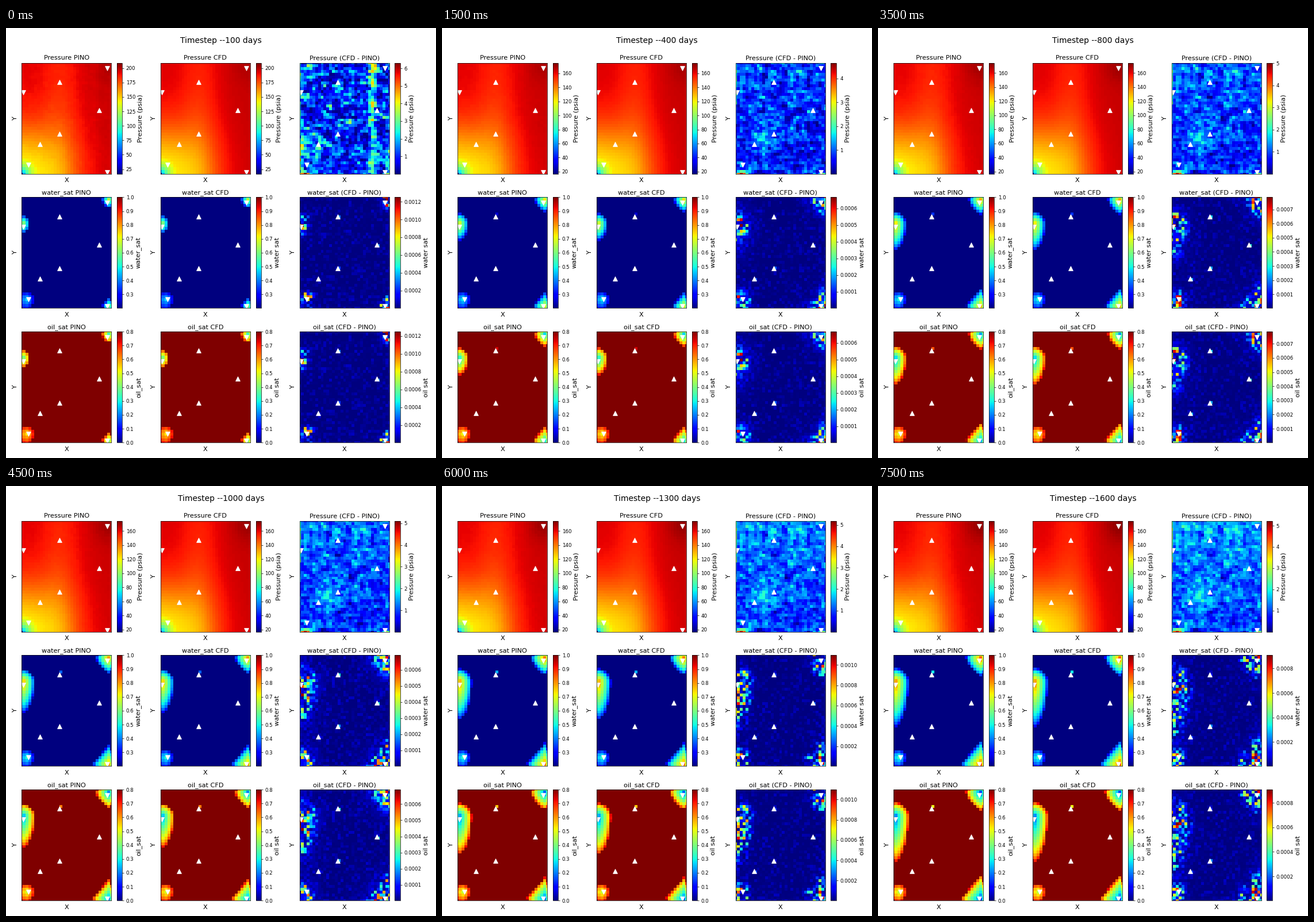
A matplotlib script for the animation above (8 s loop, 748x748 px).

```python
import numpy as np
import matplotlib.pyplot as plt
from matplotlib.animation import FuncAnimation

plt.rcParams["font.family"] = "DejaVu Sans"

SIZE, STEPS = 748, 16
NX, NY = 33, 40
X, Y = np.meshgrid(np.arange(NX), np.arange(NY))
R = np.hypot(X, Y)

INJECTORS = [(30.5, 37.0), (0.5, 28.6), (2.5, 3.1), (30.5, 0.6)]
PRODUCERS = [(13.6, 32.3), (27.6, 22.4), (13.6, 14.0), (6.6, 10.35)]


def bump(cx, cy, sx, sy):
    return np.exp(-((X - cx) / sx) ** 2 - ((Y - cy) / sy) ** 2)


def texture(rng):
    """Unit noise, loosely correlated between neighbouring cells."""
    n = rng.standard_normal((NY + 1, NX + 1))
    return (n[1:, 1:] + 0.8 * n[1:, :-1] + 0.6 * n[:-1, 1:]) / np.sqrt(2)


RNG = np.random.default_rng(7)
NOISE_FIRST, NOISE_OLD, NOISE_NEW = (texture(RNG) for _ in range(3))


def pressure(k):
    vmin, vmax = 17.0, 174.2 + 34.8 * np.exp(-1.4 * k)
    valley = 0.07 * np.exp(-((X - 14) / 7) ** 2) * (1 - 0.35 * Y / NY)
    u = 0.918 + 0.02 * X / NX - 0.27 * np.exp(-(R / 17) ** 2) - valley
    u += (0.02 + 0.03 * k / 15) * bump(31, 38, 5, 6)
    sink = 0.31 + 0.14 * np.log2(np.maximum(R, 0.22))
    u = np.clip(np.minimum(u, sink), 0, 1)
    return vmin + (vmax - vmin) * u, vmin, vmax


def pressure_error(k):
    """Signed relative error and its largest value."""
    f = k / 15
    top = 5.27 - 1.2 * np.exp(-k / 4.5) + 2.24 * np.exp(-3 * k)

    late = 0.085 * ((1 - 0.4 * f) * NOISE_OLD + 0.5 * f * NOISE_NEW)
    late += 0.13 + 0.06 * f + (0.03 + 0.06 * f) * Y / NY
    late += 0.18 * bump(10, 12.5, 2, 2.5) + 0.25 * (X == 0) * (Y > 24)

    first = 0.13 * NOISE_FIRST + 0.13
    first += (0.32 + 0.14 * bump(26, 36, 3, 6)) * np.exp(-((X - 26) / 1.6) ** 2)
    first += 0.22 * np.exp(-X / 1.6) + 0.18 * bump(5, 8, 8, 6)
    first += 0.2 * bump(31, 8, 2, 9)

    mix = np.exp(-1.5 * k)
    e = mix * first + (1 - mix) * late
    e += 0.75 * bump(2, 0, 2, 1) + 0.3 * bump(31, 0, 1.5, 1)
    return np.clip(e, -1, 1), top


def reach(cx, cy, left, right, down, up, p):
    """Distance from (cx, cy), equal to 1 at the edge of a lopsided oval."""
    dx, dy = X - cx, Y - cy
    dx = np.abs(dx) / np.where(dx < 0, left, right)
    dy = np.abs(dy) / np.where(dy < 0, down, up)
    return (dx ** p + dy ** p) ** (1 / p)


def plumes(k):
    """(distance, peak) of the flood around each injector."""
    f = k / 15
    g = f ** 0.6
    return [
        (reach(0.6, 29.6, 3, 2.4 + 2.4 * g, 3.3 + 12.8 * f, 3 + 1.8 * g, 1.8),
         0.65 + 0.22 * g),
        (reach(31, 37.8, 2.4 + 2.8 * g, 4, 2.8 + 3.4 * g, 4, 1.3), 0.62 + 0.25 * g),
        (reach(31, 0.6, 2.5 + 4.5 * g, 4, 3 + 5.2 * g, 3 + 5.2 * g, 1),
         0.6 + 0.3 * g),
        (reach(1.8, 3.2, 2.8, 2.7, 3.8, 2.6, 1.8), 0.38 + 0.1 * g),
    ]


def water(k):
    s = 0.37 * k / 15 * ((X == 14) & (Y == 33))
    for d, peak in plumes(k):
        front = 0.8 * np.clip(1 - d, 0, 1) ** 0.48
        s = np.maximum(s, peak * (front + 0.2 * np.exp(-6 * d) * (d < 1)))
    return 0.2 + 0.8 * s


def water_error(k):
    """Relative error and its largest value; small peaks show a wider halo."""
    top = 1e-3 * np.interp(k, [0, 3, 5, 7, 9, 12, 15],
                           [1.25, 0.667, 0.968, 0.786, 0.69, 1.097, 0.908])
    halo = 0.25 * np.clip(1.05 - 1e3 * top, 0.06, 1)
    rng = np.random.default_rng(100 + k)
    speck, spot, haze = rng.random((3, NY, NX))
    near, wide = 0, 0
    for d, _ in plumes(k):
        near = np.maximum(near, np.exp(-(d / 1.15) ** 4))
        wide = np.maximum(wide, np.exp(-(d / 2) ** 2))
    e = 0.06 * speck ** 4 + near * spot ** 2.5 + halo * wide * haze
    for x, y in PRODUCERS:
        e += 0.4 * rng.random() * ((X == round(x)) & (Y == round(y)))
    return e / e.max(), top


fig = plt.figure(figsize=(12, 12), dpi=SIZE / 12, facecolor="white")
heading = fig.suptitle("", fontsize=16)


def px_axes(left, top, width, height):
    return fig.add_axes([left / SIZE, 1 - (top + height) / SIZE,
                         width / SIZE, height / SIZE])


def panel(row, col, title, label):
    left, top = 27.1 + 241.8 * col, 60.6 + 233.8 * row
    ax = px_axes(left, top, 156, 193)
    im = ax.imshow(np.zeros((NY, NX)), cmap="jet", origin="lower", aspect="auto",
                   interpolation="nearest", vmin=0, vmax=1,
                   extent=(-0.5, NX - 0.5, -0.5, NY - 0.5))
    for wells, marker in ((INJECTORS, "v"), (PRODUCERS, "^")):
        ax.scatter(*zip(*wells), s=80, marker=marker, color="white", zorder=2)
    ax.set(xlim=(0, NX - 1), ylim=(0, NY - 1), xticks=[], yticks=[])
    ax.set_title(title, fontsize=13)
    ax.set_xlabel("X", fontsize=13, labelpad=7.5)
    ax.set_ylabel("Y", fontsize=13, labelpad=7.5)
    bar = fig.colorbar(im, cax=px_axes(left + 165.75, top, 9.65, 193))
    bar.set_label(label, fontsize=13)
    return im


ROWS = [("Pressure", ["Pressure (psia)"] * 3),
        ("water_sat", ["water_sat", "water sat", "water sat"]),
        ("oil_sat", ["oil_sat", "oil sat", "oil sat"])]
KINDS = ["{} PINO", "{} CFD", "{} (CFD - PINO)"]
images = [[panel(r, c, KINDS[c].format(name), labels[c]) for c in range(3)]
          for r, (name, labels) in enumerate(ROWS)]


def show(row, fields, limits):
    for im, field, (lo, hi) in zip(images[row], fields, limits):
        im.set_data(field)
        im.set_clim(lo, hi)


def update(k):
    heading.set_text(f"Timestep --{100 * (k + 1)} days")

    p, lo, hi = pressure(k)
    err, top = pressure_error(k)
    show(0, (p - 0.6 * top * err, p, top * np.abs(err)),
         [(lo, hi), (lo, hi), (0.008, top)])

    sw = water(k)
    err, top = water_error(k)
    err = err * top
    show(1, (sw - err, sw, err), [(0.2001, 1)] * 2 + [(2e-6, top)])
    show(2, (1 - sw + err, 1 - sw, err), [(0, 0.8)] * 2 + [(2e-6, top)])
    return []


anim = FuncAnimation(fig, update, frames=STEPS, interval=500, repeat=True,
                     repeat_delay=0, blit=False)
plt.show()
```
